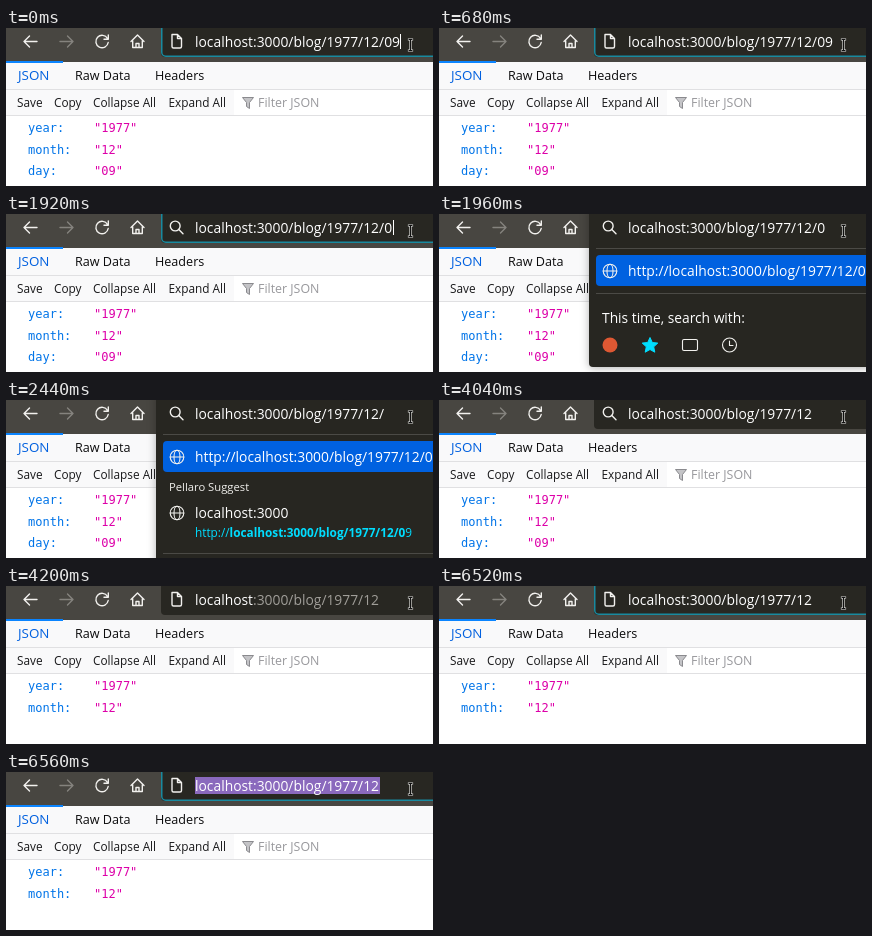
Write an HTML page that moves like this. It is 427 by 158 pixels and loops after 8 s.

```html
<!DOCTYPE html>
<html lang="en">
<head>
<meta charset="utf-8">
<title>Editing a URL</title>
<style>
html, body { margin: 0; width: 100%; height: 100%; overflow: hidden; background: #fff; }
svg { display: block; width: 427px; height: 158px; font-family: "Open Sans", "Noto Sans", sans-serif; }
text { white-space: pre; }

.url { font-size: 13.85px; fill: #fff; }
.tab { font-size: 12.6px; font-weight: 500; fill: #0c0c0d; }
.tab .on { font-size: 13.4px; fill: #0060df; }
.tool { font-size: 11.8px; fill: #18181a; }
.tool .hint { font-size: 12.4px; fill: #98989c; }
.mono { font: 12px "DejaVu Sans Mono", monospace; fill: #0074e8; }
.mono .str { fill: #dd00a9; }
.link { font-size: 11.8px; fill: #00ddff; }
.link .b { font-weight: 700; }
.line { fill: none; stroke: #f2f1ee; stroke-width: 1.4; stroke-linecap: round; stroke-linejoin: round; }
.thin { stroke-width: 1.1; }
.panel { fill: #272621; filter: drop-shadow(0 1px 4px rgba(0, 0, 0, .3)); }
.rule { stroke: #4b4a46; }

[class*="t-"] { animation: 8s step-end infinite; }
.t-caret { animation-name: caret; }
.t-nine { animation-name: nine; }
.t-zero { animation-name: zero; }
.t-slash { animation-name: slash; }
.t-row-zero { animation-name: rowZero; }
.t-row-slash { animation-name: rowSlash; }
.t-visit { animation-name: visit; }
.t-bold-zero { animation-name: boldZero; }
.t-bold-slash { animation-name: boldSlash; }
.t-page { animation-name: page; }
.t-search { animation-name: search; }
.t-ring { animation-name: ring; }
.t-popup { animation-name: popup; }
.t-engines { animation-name: engines; }
.t-suggest { animation-name: suggest; }
.t-dim { animation-name: dim; }
.t-blank { animation-name: blank; }
.t-day { animation-name: day; }
.t-select { animation-name: select; }

@keyframes caret {
  0% { opacity: 1; transform: none }
  8.5% { opacity: 0; transform: none }
  24% { opacity: 1; transform: translateX(-7px) }
  24.5%, 100% { opacity: 0; transform: none }
}
@keyframes nine { 0% { visibility: visible } 24%, 100% { visibility: hidden } }
@keyframes zero { 0% { visibility: visible } 30.5%, 100% { visibility: hidden } }
@keyframes slash { 0% { visibility: visible } 37%, 100% { visibility: hidden } }
@keyframes rowZero { 0% { visibility: inherit } 31%, 100% { visibility: hidden } }
@keyframes rowSlash { 0% { visibility: inherit } 37.5%, 100% { visibility: hidden } }
@keyframes visit {
  0% { transform: translateX(13px) }
  31% { transform: translateX(5px) }
  37.5%, 100% { transform: none }
}
@keyframes boldZero { 0% { font-weight: 700 } 31.5%, 100% { font-weight: 400 } }
@keyframes boldSlash { 0% { font-weight: 700 } 39%, 100% { font-weight: 400 } }
@keyframes page { 0% { opacity: 1 } 24% { opacity: 0 } 51%, 100% { opacity: 1 } }
@keyframes search { 0% { opacity: 0 } 24% { opacity: 1 } 51%, 100% { opacity: 0 } }
@keyframes ring { 0% { opacity: 1 } 50.5% { opacity: 0 } 81.5%, 100% { opacity: 1 } }
@keyframes popup { 0% { opacity: 0 } 24.5% { opacity: 1 } 50.5%, 100% { opacity: 0 } }
@keyframes engines { 0% { opacity: 1 } 25%, 100% { opacity: 0 } }
@keyframes suggest { 0% { opacity: 0 } 25%, 100% { opacity: 1 } }
@keyframes dim { 0% { fill: #fff } 51% { fill: #a09e99 } 81.5%, 100% { fill: #fff } }
@keyframes blank { 0% { opacity: 0 } 51% { opacity: 1 } 52.5%, 100% { opacity: 0 } }
@keyframes day { 0% { opacity: 1 } 51%, 100% { opacity: 0 } }
@keyframes select { 0% { opacity: 0 } 82%, 100% { opacity: 1 } }
</style>
</head>
<body>
<svg viewBox="0 0 427 158">
  <defs>
    <g id="globe" class="line thin">
      <circle r="6.8"/>
      <ellipse rx="3" ry="6.8"/>
      <path d="M-6.8 0H6.8"/>
    </g>
  </defs>

  <!-- JSON viewer -->
  <rect width="427" height="158" fill="#fff"/>
  <rect y="34" width="427" height="54" fill="#f9f9fa"/>
  <rect x="228" y="62" width="199" height="25" fill="#fff"/>
  <path d="M0 61.5H427M0 87.5H427" stroke="#e0e0e2"/>
  <rect y="33" width="57" height="2" fill="#0a84ff"/>
  <g class="tab">
    <text x="12" y="52" class="on">JSON</text>
    <text x="69" y="52">Raw Data</text>
    <text x="149" y="52">Headers</text>
  </g>
  <g class="tool">
    <text x="11" y="79">Save</text>
    <text x="48" y="79">Copy</text>
    <text x="87" y="79">Collapse All</text>
    <text x="162.5" y="79">Expand All</text>
    <text x="252" y="79" class="hint">Filter JSON</text>
  </g>
  <path d="M236.5 69.5H247.5L243.5 74.5V80.5L240.5 78.5V74.5Z" fill="#c4c4c7" stroke="#8a8a8e" stroke-linejoin="round"/>
  <g class="mono">
    <text x="22" y="104">year:</text><text x="88" y="104" class="str">"1977"</text>
    <text x="22" y="126">month:</text><text x="88" y="126" class="str">"12"</text>
    <g class="t-day"><text x="22" y="147">day:</text><text x="88" y="147" class="str">"09"</text></g>
  </g>
  <rect class="t-blank" y="34" width="427" height="124" fill="#fff"/>

  <!-- Browser toolbar -->
  <rect width="427" height="33" fill="#484641"/>
  <rect x="57" y="33" width="370" height="1" fill="#484641"/>
  <g class="line">
    <path d="M31 13.5H18M23.5 8L18 13.5L23.5 19"/>
    <path d="M54 13.5H67M61.5 8L67 13.5L61.5 19" stroke="#85837e"/>
    <path d="M101.5 10.5A6.2 6.2 0 1 0 102.2 14.5M102.3 7V11.2H98"/>
    <path d="M125 13.5L131.5 7L138 13.5M126.7 12.5V19.5H136.3V12.5M130 19.5V15.5H133V19.5"/>
  </g>
  <rect x="155" y="-10" width="290" height="39" rx="4" fill="#282722"/>
  <rect class="t-ring" x="155.75" y="-10" width="290" height="38.25" rx="4" fill="none" stroke="#188a9f" stroke-width="1.5"/>

  <!-- Address dropdown -->
  <g class="t-popup">
    <rect class="panel t-engines" x="150" y="-10" width="300" height="163" rx="4"/>
    <rect class="panel t-suggest" x="150" y="-10" width="300" height="190" rx="4"/>
    <path class="rule" d="M157 34.5H427"/>
    <rect x="157" y="41" width="290" height="31" rx="4" fill="#0061e0"/>
    <use href="#globe" x="171" y="57"/>
    <text class="url" x="189" y="62">http://localhost:3000/blog/1977/12<tspan class="t-row-slash">/</tspan><tspan class="t-row-zero">0</tspan></text>
    <text class="url t-visit" x="421" y="62">— Visit</text>
    <g class="t-engines">
      <path class="rule" d="M157 79.5H427"/>
      <text x="163" y="108.5" font-size="13.8" fill="#fff">This time, search with:</text>
      <circle cx="171" cy="131" r="7.5" fill="#de5833"/>
      <path d="M211 123.5L213.3 128.5L218.8 129.1L214.7 132.8L215.8 138.2L211 135.5L206.2 138.2L207.3 132.8L203.2 129.1L208.7 128.5Z" fill="#00ddff" stroke="#00ddff" stroke-linejoin="round"/>
      <g class="line thin">
        <rect x="243.5" y="125.5" width="15" height="11" rx="1.5"/>
        <circle cx="290.5" cy="131" r="7"/>
        <path d="M290.5 127V131.5H294"/>
      </g>
    </g>
    <g class="t-suggest">
      <text x="163" y="91" font-size="11.25" fill="#f2f1ee">Pellaro Suggest</text>
      <use href="#globe" x="171" y="113"/>
      <text class="url" x="189" y="118">localhost:3000</text>
      <text class="link" x="189" y="137">http://<tspan class="b">localhost:3000/blog/1977/12</tspan><tspan class="t-bold-slash">/</tspan><tspan class="t-bold-zero">0</tspan>9</text>
      <path class="rule" d="M157 153.5H427"/>
    </g>
  </g>

  <!-- Address field -->
  <g class="t-page line"><path d="M166 6.5H171.5L175.5 10.5V18.5Q175.5 20 174 20H167.5Q166 20 166 18.5ZM171.5 6.5V10.5H175.5"/></g>
  <g class="t-search line"><circle cx="169.2" cy="12" r="4.9"/><path d="M172.8 15.6L177 19.8"/></g>
  <rect class="t-select" x="189" y="5" width="185" height="17" fill="#8a69bd"/>
  <text class="url" x="189" y="18.5">localhost<tspan class="t-dim">:3000/blog/1977/12</tspan><tspan class="t-slash">/</tspan><tspan class="t-zero">0</tspan><tspan class="t-nine">9</tspan></text>
  <rect class="t-caret" x="394" y="6" width="1" height="15" fill="#fff"/>

  <!-- Mouse pointer -->
  <g fill="none" stroke-linecap="square">
    <path d="M403 11.5H406M404.5 12V22M403 22.5H406" stroke="#e4e4e2" stroke-width="2.2"/>
    <path d="M403 11.5H406M404.5 12V22M403 22.5H406" stroke="#111"/>
  </g>
</svg>
</body>
</html>
```
